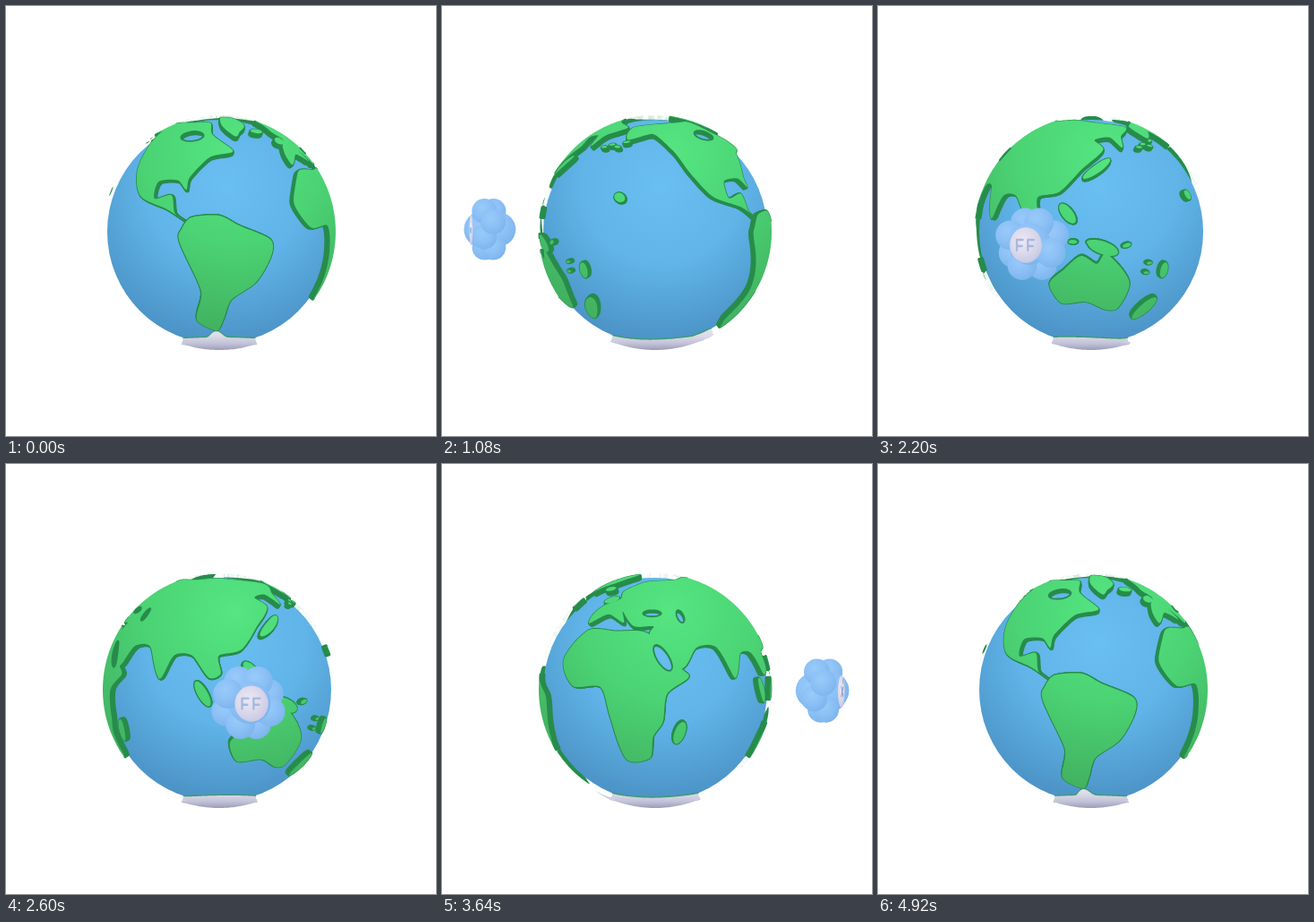
Write an HTML page with a canvas that moves like this. It is 480 px wide and 480 px high and loops after 4.96 s.

```html
<!DOCTYPE html>
<html lang="en">
<head>
<meta charset="utf-8">
<title>Turning globe</title>
<style>
  html, body { margin: 0; width: 100%; height: 100%; overflow: hidden; background: #fff; }
  canvas { display: block; }
</style>
</head>
<body>
<canvas id="stage" width="480" height="480"></canvas>
<script>
const ctx = document.getElementById('stage').getContext('2d');
const LOOP = 4960, STEP = 40;
const CX = 238, CY = 252, SEA = 125, TOP = 130, ICE = 132.5;
const RAD = Math.PI / 180, TILT = 3 * RAD;
const WALL = '#278c4b';

// Smooth closed curve through longitude, latitude pairs
function coast(...a) {
  const n = a.length / 2, at = i => [a[2 * (i % n)], a[2 * (i % n) + 1]], out = [];
  for (let i = 0; i < n; i++) {
    const [p, q, r, s] = [at(i + n - 1), at(i), at(i + 1), at(i + 2)];
    for (let k = 0; k < 1; k += .1) {
      const h = k * k * (3 - 2 * k), u = .4 * k * (1 - k) ** 2, v = .4 * k * k * (1 - k);
      out.push([0, 1].map(d => q[d] + (r[d] - q[d]) * h + u * (r[d] - p[d]) - v * (s[d] - q[d])));
    }
  }
  return out;
}

// Oval of a given half length in degrees
function oval(lon, lat, size, turn = 0, flat = .45) {
  const c = Math.cos(turn * RAD), s = Math.sin(turn * RAD);
  return Array.from({ length: 20 }, (_, i) => {
    const x = size * Math.cos(i * Math.PI / 10), y = size * flat * Math.sin(i * Math.PI / 10);
    return [lon + (x * c - y * s) / Math.cos(lat * RAD), lat + x * s + y * c];
  });
}

// Row of islets that wavers a little
function chain(n, lon, lat, dLon, dLat, size) {
  return Array.from({ length: n }, (_, i) =>
    oval(lon + dLon * i, lat + dLat * i + 1.5 * Math.sin(i * 2.4), size, 40 * Math.sin(i * 3)));
}

const lands = [
  // North and South America, Greenland
  coast(-77,8, -88,14, -106,20, -117,33, -125,47, -140,60, -162,55, -166,66, -140,70, -100,72,
    -74,72, -67,60, -50,47, -66,43, -77,31, -78,24, -84,29, -96,28, -96,19, -86,21, -83,12),
  coast(-79,4, -74,10, -60,11, -50,6, -34,-1, -33,-9, -40,-23, -53,-33, -57,-46, -62,-55,
    -76,-47, -70,-28, -80,-2),
  coast(-45,58, -57,70, -55,82, -22,80, -24,69, -38,62),
  // Africa, Eurasia, Australia
  coast(-6,33, 13,33, 33,32, 50,14, 54,9, 43,1, 41,-13, 36,-21, 34,-33, 20,-34, 14,-11, 9,4,
    -8,4, -18,17),
  coast(34,31, 40,12, 52,14, 60,24, 72,24, 81,8, 88,20, 98,20, 107,9, 113,11, 112,20, 124,23,
    136,36, 150,48, 144,55, 158,57, 165,49, 170,58, 187,66, 160,71, 110,76, 70,73, 25,71, 5,61,
    7,54, -4,49, -9,43, -8,37, 4,43, 17,38, 14,45, 24,36, 36,36),
  coast(118,-24, 127,-16, 136,-9, 144,-13, 149,-8, 162,-23, 158,-38, 150,-39, 138,-34, 123,-35),
  oval(145, 36, 9, 40, .25),    // Japan
  oval(129, 12, 6, -50),        // Philippines
  oval(122, 1, 6, 60),          // Borneo
  oval(104, 1, 7, -60, .35),    // Sumatra
  oval(147, -5, 8, -20, .4),    // New Guinea
  oval(182, -17, 4, 90, .6),    // Fiji
  oval(177, -39, 8, 58),        // New Zealand
  oval(203, 20, 3, -30, .75),   // Hawaii
  oval(50, -19, 6, 75),         // Madagascar
  oval(-1, 53, 4, 20, .6),      // Britain
  oval(-17, 62, 3.5, 0, .6),    // Iceland
  ...chain(4, 180, 49, 6, 1, 1.8),
  ...chain(4, 132, -2, 9, -1, 2.2),
  ...chain(2, 171, -18, 1, 4, 1.5)];

// Hudson Bay, Black Sea, Caspian Sea, Red Sea
const basins = [oval(-86, 58, 6, 0, .7), oval(35, 44, 4.5), oval(54, 42, 4, 95), oval(41, 19, 7.5, -60, .4)];

// Two broad lobes and one peninsula
const ice = Array.from({ length: 180 }, (_, i) => {
  const lon = i * 2 - 180;
  return [lon, -69.5 + 2 * Math.cos(2 * (lon - 120) * RAD) + 8 * Math.exp(-(((lon + 63) / 8) ** 2))];
});

function shade(g, colors) {
  colors.forEach((c, i) => g.addColorStop(i / (colors.length - 1), c));
  return g;
}
const glow = (x, y, r, ...colors) => shade(ctx.createRadialGradient(x, y, 0, x, y, r), colors);
const seaFill = glow(245, 200, 180, '#69bef2', '#60b4e8', '#4b91c4');
const landFill = glow(255, 165, 200, '#55e581', '#4bd374', '#42b160');
const iceFill = shade(ctx.createLinearGradient(0, 367, 0, 386), ['#dedeeb', '#c3c3d8', '#9393b0']);

function disc(x, y, rx, ry, fill) {
  ctx.fillStyle = fill;
  ctx.beginPath();
  ctx.ellipse(x, y, rx, ry, 0, 0, 7);
  ctx.fill();
}

function turned([lon, lat], mid) {
  const a = (lon - mid) * RAD, b = lat * RAD;
  const y = Math.sin(b), z = Math.cos(b) * Math.cos(a);
  return [Math.cos(b) * Math.sin(a),
    y * Math.cos(TILT) - z * Math.sin(TILT),
    y * Math.sin(TILT) + z * Math.cos(TILT)];
}

// Hidden points slide to the limb, or under the sea for the far side.
function outline(pts, r, side) {
  const fill = new Path2D(), edge = new Path2D();
  if (!pts.some(p => p[2] * side > 0)) return { fill, edge };
  let pen = false;
  for (const [x, y, z] of [...pts, pts[0]]) {
    const seen = z * side > 0;
    const k = seen ? r : (side > 0 ? r : SEA - 2) / Math.hypot(x, y);
    const px = CX + x * k, py = CY - y * k;
    fill.lineTo(px, py);
    if (seen) pen ? edge.lineTo(px, py) : edge.moveTo(px, py);
    pen = seen;
  }
  return { fill, edge };
}

function paint(shapes, r, side, color, line = 0) {
  ctx.fillStyle = ctx.strokeStyle = color;
  ctx.lineWidth = line;
  for (const s of shapes) {
    const o = outline(s, r, side);
    ctx.fill(o.fill);
    if (line) ctx.stroke(o.edge);
  }
}

// A sea sunk into the land
function paintBasin(pts) {
  const rim = outline(pts, TOP, 1);
  ctx.save();
  ctx.clip(rim.fill);
  paint([pts], TOP, 1, WALL);
  paint([pts], SEA, 1, seaFill);
  ctx.restore();
  ctx.strokeStyle = WALL;
  ctx.lineWidth = 1.8;
  ctx.stroke(rim.edge);
}

function drawGlobe(t) {
  const mid = -60 - 355.3 * t / (LOOP - STEP);
  const turn = pts => pts.map(p => turned(p, mid));
  const ground = lands.map(turn), cap = [turn(ice)];
  ctx.lineJoin = ctx.lineCap = 'round';
  paint(ground, TOP - .5, -1, WALL);
  paint(cap, ICE, -1, iceFill);
  disc(CX, CY, SEA, SEA, seaFill);
  paint(cap, SEA, 1, '#3d9c72', 2.5);
  for (let r = SEA + 1; r <= ICE; r += 1.5) paint(cap, r, 1, iceFill, 1.5);
  for (let r = SEA; r < TOP - .5; r++) paint(ground, r, 1, WALL, 3);
  paint(ground, TOP, 1, landFill);
  basins.map(turn).forEach(paintBasin);
}

// Across, up, outward, radius
const puffs = [[0, 0, -11, 19], [0, 0, 8, 20]];
for (let i = 0; i < 8; i++) {
  const a = (i + .5) * Math.PI / 4;
  puffs.push([22 * Math.cos(a), 22 * Math.sin(a), i % 2 ? 5 : -5, 14]);
}

function strokes(color, ...lines) {
  ctx.strokeStyle = color;
  ctx.lineWidth = 2;
  ctx.beginPath();
  for (const [x, y, u, v] of lines) {
    ctx.moveTo(x, y);
    ctx.lineTo(u, v);
  }
  ctx.stroke();
}

function drawFace(t) {
  disc(0, 0, 16, 17, glow(-3, -4, 21, '#ebe7f5', '#dedbed', '#c9cae4'));
  if (t < 2200) {
    for (const x of [-7, 3]) {
      disc(x, -1, 4, 5, '#f6f6fc');
      disc(x - .5, 0, 2.7, 3.8, '#5aa6c8');
    }
  } else if (t < 2900) {
    for (const x of [-9, 2]) strokes('#a6b9dc', [x, -5, x, 5], [x, -5, x + 6, -5], [x, 1, x + 5, 1]);
  } else {
    strokes('#6287ad', [0, -5, 8, 5], [8, -5, 0, 5], [8, -13, 8, -9]);
  }
}

function drawCloud(t, a) {
  const s = Math.sin(a), c = Math.cos(a), k = 6.5 / (6.5 - c);
  ctx.save();
  ctx.translate(CX + 186 * s * k, 249.5 + 14.5 * c * k);
  ctx.scale(k, k);
  puffs.map(([u, v, w, r]) => [u * c + w * s, -v, w * c - u * s, r])
    .sort((p, q) => p[2] - q[2])
    .forEach(([x, y, , r]) =>
      disc(x, y, r, r, glow(x - r * .2, y - r * .3, r * 1.4, '#98cbfa', '#8dc1f6', '#7db3ec')));
  if (c > -.1) {
    ctx.translate(20 * s, 1);
    ctx.scale(Math.max(c, .12), 1);
    drawFace(t);
  }
  ctx.restore();
}

function draw(now) {
  const t = Math.floor(now % LOOP / STEP) * STEP;
  const a = (2 + 324 * (t - 2500) / LOOP) * RAD, front = Math.cos(a) > 0;
  ctx.fillStyle = '#fff';
  ctx.fillRect(0, 0, 480, 480);
  if (!front) drawCloud(t, a);
  drawGlobe(t);
  if (front) drawCloud(t, a);
}

const start = performance.now();
function tick() {
  draw(performance.now() - start);
  requestAnimationFrame(tick);
}
tick();
</script>
</body>
</html>
```
